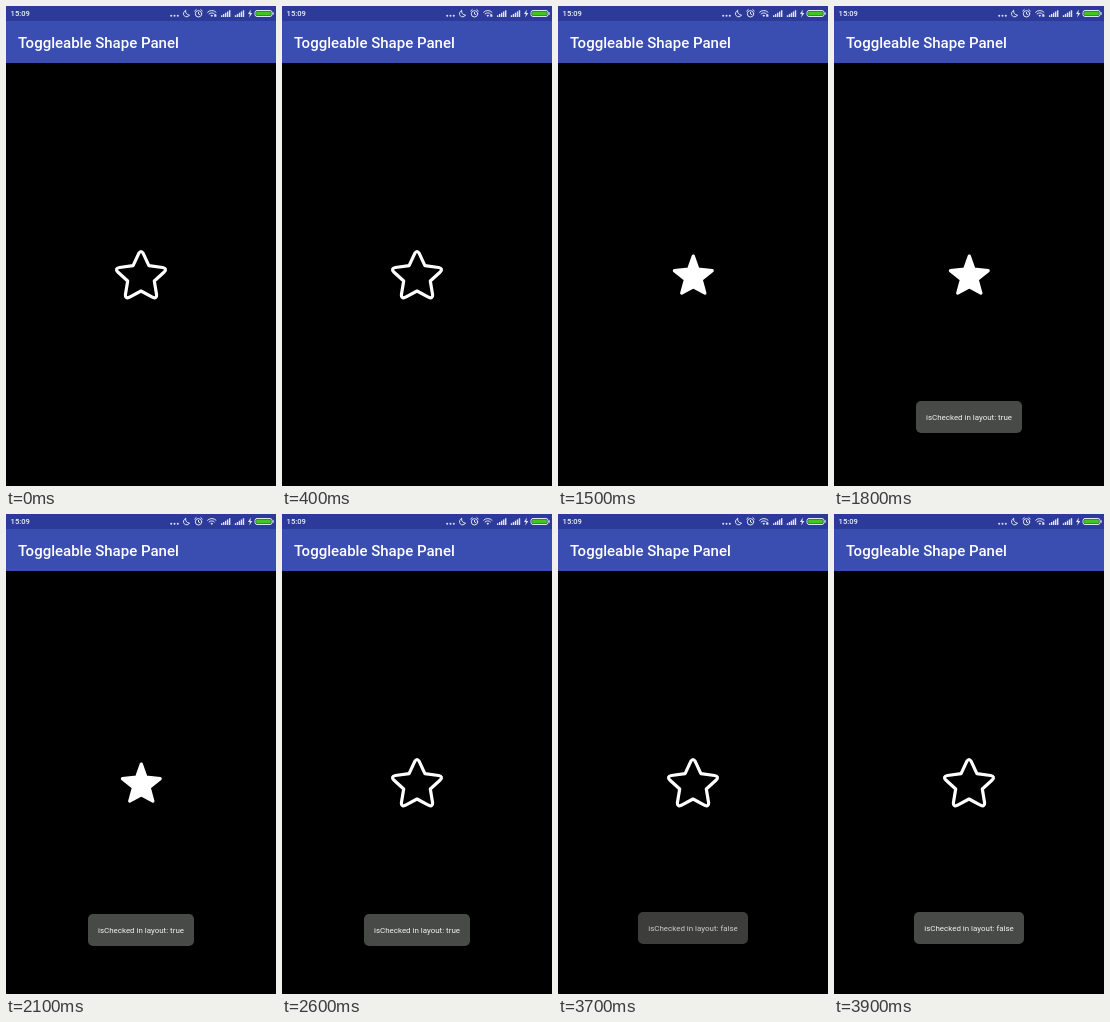
Write an HTML page that moves like this. It is 270 by 480 pixels and loops after 4000 ms.

```html
<!DOCTYPE html>
<html lang="en">
<head>
<meta charset="utf-8">
<title>Star toggle</title>
<style>
  html, body { margin: 0; width: 100%; height: 100%; overflow: hidden; background: #000; }
  svg { display: block; width: 100vw; height: 100vh; }
  text { font-family: Roboto, "Open Sans", sans-serif; fill: #fff; }
  .clock { font-size: 7.6px; font-weight: 500; fill: #f1f3fa; }
  .title { font-size: 15px; font-weight: 500; }
  .toast text { font-size: 7.95px; text-anchor: middle; fill: #f2f2f2; }
  .toast rect { fill: #484a47; }
  .line { fill: none; stroke: #dfe3f4; stroke-width: 1; stroke-linecap: round; stroke-linejoin: round; }
  .solid { fill: #dfe3f4; }
  .star { stroke: #fff; stroke-width: 3.2; stroke-linejoin: round; }

  .off, .on, .toast, .traffic { animation: 4s step-end infinite; }
  .off { animation-name: off; }
  .on { animation-name: on; }
  .first { animation-name: first; }
  .second { animation-name: second; }
  .traffic { animation-name: traffic; }

  @keyframes off { 0%, 65% { opacity: 1 } 22.5% { opacity: 0 } }
  @keyframes on { 0%, 65% { opacity: 0 } 22.5% { opacity: 1 } }
  @keyframes traffic { 0%, 77.5% { opacity: 1 } 52.5% { opacity: 0 } }

  /* each toast rises, overshoots and settles */
  @keyframes first {
    0%, 90%, 100% { opacity: 0; transform: translateY(7px) }
    40% { opacity: .35; transform: translateY(6px) }
    42.5% { opacity: .85; transform: translateY(-2px) }
    45% { opacity: 1; transform: translateY(-5px) }
    47.5% { opacity: 1; transform: translateY(-2px) }
    50% { opacity: 1; transform: none }
    87.5% { opacity: .5; transform: none }
  }
  @keyframes second {
    0%, 100% { opacity: 0; transform: translateY(7px) }
    90% { opacity: .35; transform: translateY(6px) }
    92.5% { opacity: .85; transform: translateY(-2px) }
    95% { opacity: 1; transform: translateY(-5px) }
    97.5% { opacity: 1; transform: translateY(-2px) }
  }
</style>
</head>
<body>
<svg viewBox="0 0 270 480">
  <defs>
    <path id="bars" d="M0 9.2h1.4v1.8h-1.4zM2 8h1.4v3h-1.4zM4 6.8h1.4v4.2h-1.4zM6 5.5h1.4v5.5h-1.4zM8 4.2h1.4v6.8h-1.4z"/>
  </defs>

  <rect width="270" height="480"/>
  <rect width="270" height="15" fill="#2c3b99"/>
  <rect y="15" width="270" height="42" fill="#3a4db0"/>

  <text class="clock" x="4.6" y="10.2">15:09</text>
  <g class="solid">
    <circle cx="165.2" cy="9.8" r="1"/>
    <circle cx="168.5" cy="9.8" r="1"/>
    <circle cx="171.8" cy="9.8" r="1"/>
    <use href="#bars" x="215"/>
    <use href="#bars" x="228.8"/>
    <path d="M244.8 3.6L242 8h1.9l-.7 3.6L246.4 7h-2z"/>
  </g>
  <path class="line" d="M179.6 4.6a3.2 3.2 0 1 0 3.9 4.4a3.6 3.6 0 0 1-3.9-4.4z"/>
  <g class="line">
    <circle cx="192.5" cy="7.8" r="3.2"/>
    <path d="M192.5 6.4v1.6l1.2.5M188.7 5l1.5-1.4M196.3 5l-1.5-1.4"/>
  </g>
  <g class="line" stroke-width="1.2">
    <path d="M201.6 6.2a5.8 5.8 0 0 1 8.4 0M203.1 7.9a3.8 3.8 0 0 1 5.4 0"/>
    <path class="solid" stroke="none" d="M204.5 9.4a2 2 0 0 1 2.6 0l-1.3 1.6z"/>
  </g>
  <path class="traffic solid" d="M208.2 10.8v-2l1.1-.9l1.1.9v2z"/>
  <rect class="line" x="249" y="4.5" width="17" height="6" rx="2"/>
  <rect x="250.2" y="5.4" width="14.6" height="4.2" rx="1.2" fill="#43c51f"/>
  <path class="solid" d="M266.5 6.3h1.2v2.4h-1.2z"/>

  <text class="title" x="12" y="42">Toggleable Shape Panel</text>

  <path class="star off" fill="none" d="M132.8 247.4Q135 243.6 137.2 247.4L142.9 259.6L156.5 261.5Q161.4 262.6 158.2 266L148.3 275L150.6 288.8Q150.9 293 146.8 291.3L135 285L123.2 291.3Q119.1 293 119.4 288.8L121.7 275L111.8 266Q108.6 262.6 113.5 261.5L127.1 259.6Z"/>
  <path class="star on" fill="#fff" d="M135.3 250.1L139.9 263L154.2 264.7L143.2 273.6L146.9 287.1L135.3 280.8L123.7 287.1L127.4 273.6L116.4 264.7L130.7 263Z"/>

  <g class="toast first">
    <rect x="82" y="400" width="106" height="32" rx="5"/>
    <text x="135" y="419.3">isChecked in layout: true</text>
  </g>
  <g class="toast second">
    <rect x="80" y="400" width="110" height="32" rx="5"/>
    <text x="135" y="419.3">isChecked in layout: false</text>
  </g>
</svg>
</body>
</html>
```
